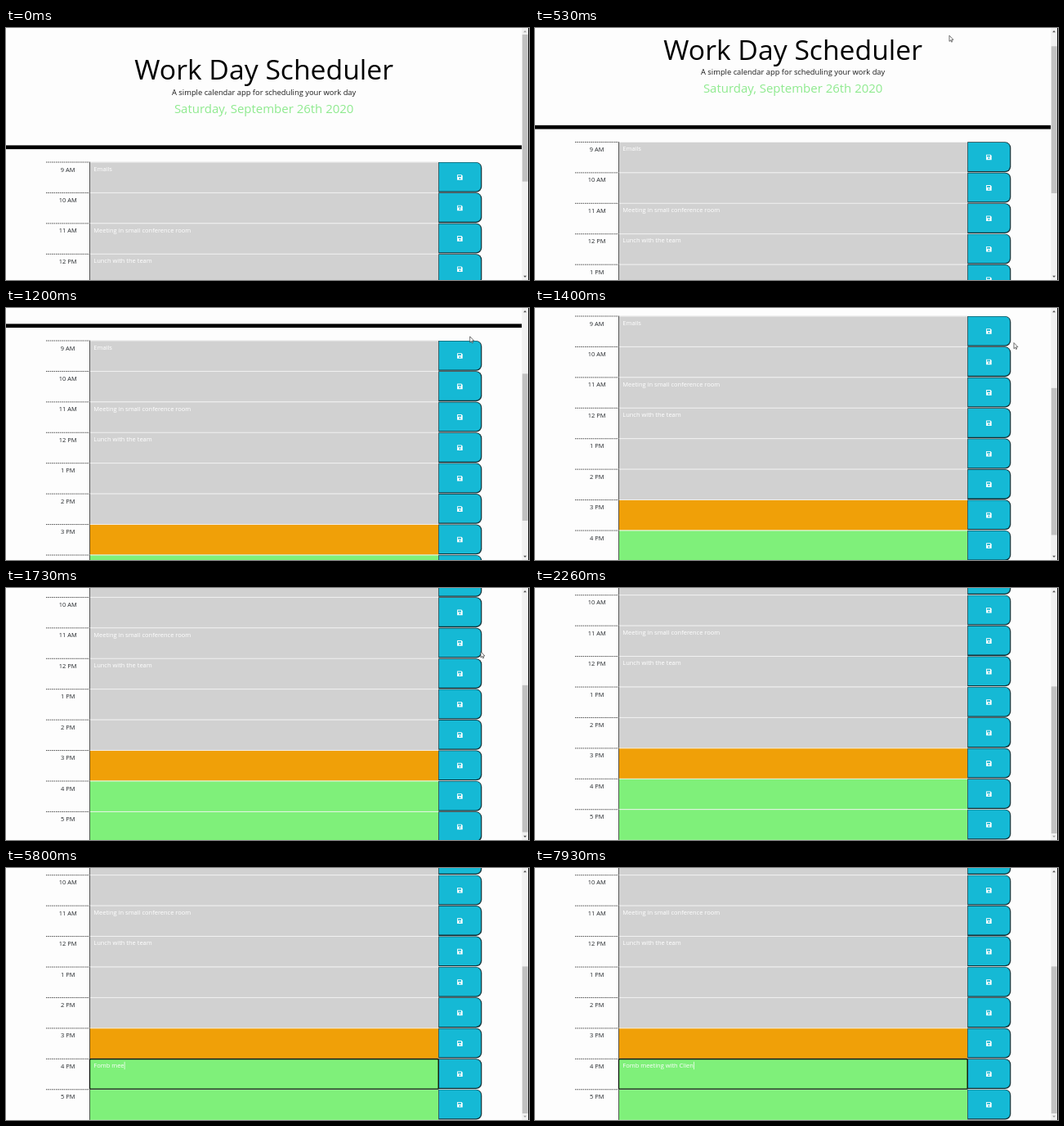
An HTML page with a canvas for the animation above (8000 ms loop, 640 by 308 pixels).

```html
<!DOCTYPE html>
<html lang="en">
<head>
<meta charset="utf-8">
<title>Work Day Scheduler</title>
<style>
html, body { margin: 0; width: 100%; height: 100%; overflow: hidden; background: #fdfdfd; }
canvas { display: block; width: 640px; height: 308px; }
</style>
</head>
<body>
<canvas id="stage"></canvas>
<script>
const W = 640, H = 308, LOOP = 8000, TICK = 1000 / 15;
const PAGE_W = 631.3, MAX_SCROLL = 192.7;
const ROW_TOP = 163.7, ROW_H = 37.43;
const AREA_X = 102.5, AREA_R = 529.2, BTN_R = 582;
const PAST = '#d1d1d1', PRESENT = '#f0a008', FUTURE = '#7ff07a', CYAN = '#15b9d5';

const rows = [
  ['9 AM', PAST, 'Emails'],
  ['10 AM', PAST, ''],
  ['11 AM', PAST, 'Meeting in small conference room'],
  ['12 PM', PAST, 'Lunch with the team'],
  ['1 PM', PAST, ''],
  ['2 PM', PAST, ''],
  ['3 PM', PRESENT, ''],
  ['4 PM', FUTURE, ''],
  ['5 PM', FUTURE, '']
];
const EDIT_ROW = 7, FOCUS_AT = 3000;
const typed = 'Fomb meeting with Clien';
const keyTimes = [3930, 4330, 4530, 4730, 5060, 5530, 5600, 5800, 5930, 6000, 6060, 6130,
  6200, 6460, 6600, 6660, 6800, 6930, 7200, 7460, 7660, 7730, 7930];

const scrollKeys = [[367, 0], [733, 54], [1400, 154], [1600, 181], [1733, 190], [1867, MAX_SCROLL]];
const pointerX = [[400, 495], [733, 525], [1400, 586], [1800, 580], [2130, 530]];
const pointerY = [[400, 4], [733, 17], [1400, 42.5], [1800, 85], [2130, 220]];

const canvas = document.getElementById('stage');
const dpr = window.devicePixelRatio || 1;
canvas.width = W * dpr;
canvas.height = H * dpr;
const c = canvas.getContext('2d');

function lerpKeys(keys, t) {
  if (t <= keys[0][0]) return keys[0][1];
  for (let i = 1; i < keys.length; i++) {
    const [t0, v0] = keys[i - 1], [t1, v1] = keys[i];
    if (t < t1) return v0 + (v1 - v0) * (t - t0) / (t1 - t0);
  }
  return keys[keys.length - 1][1];
}

function rect(x, y, w, h, fill) {
  c.fillStyle = fill;
  c.fillRect(x, y, w, h);
}

function text(str, x, y, size, fill, align = 'left') {
  c.font = `${size}px "Open Sans", sans-serif`;
  c.textAlign = align;
  c.fillStyle = fill;
  c.fillText(str, x, y);
}

function poly(points, fill, stroke) {
  c.beginPath();
  points.forEach(([x, y]) => c.lineTo(x, y));
  c.closePath();
  c.fillStyle = fill;
  c.fill();
  if (stroke) {
    c.strokeStyle = stroke;
    c.lineWidth = 0.7;
    c.stroke();
  }
}

function rightRounded(x, y, w, h, r, fill) {
  c.beginPath();
  c.roundRect(x, y, w, h, [0, r, r, 0]);
  c.fillStyle = fill;
  c.fill();
}

function drawHeader() {
  const mid = PAGE_W / 2;
  text('Work Day Scheduler', mid, 63.2, 33.7, '#000', 'center');
  text('A simple calendar app for scheduling your work day', mid, 81.6, 9.36, '#1c1c1c', 'center');
  text('Saturday, September 26th 2020', mid, 104, 14.97, '#8fea8f', 'center');
  rect(0, 143.4, PAGE_W, 4.7, '#000');
}

function drawSaveIcon(x, y) {
  poly([[x - 3.3, y - 3.3], [x + 2, y - 3.3], [x + 3.3, y - 2], [x + 3.3, y + 3.3], [x - 3.3, y + 3.3]], '#fff');
  rect(x - 2.3, y - 2.4, 3.9, 1.9, CYAN);
  c.beginPath();
  c.arc(x, y + 1.4, 1, 0, Math.PI * 2);
  c.fillStyle = CYAN;
  c.fill();
}

function drawRow([label, color, note], y) {
  c.setLineDash([1.5, 0.9]);
  c.strokeStyle = '#222';
  c.lineWidth = 0.8;
  c.beginPath();
  c.moveTo(49, y + 0.3);
  c.lineTo(AREA_X, y + 0.3);
  c.stroke();
  c.setLineDash([]);
  text(label, 75.7, y + 11.9, 7.49, '#24282c', 'center');

  rect(AREA_X, y, AREA_R - AREA_X, ROW_H, color);
  rect(AREA_X, y - 0.2, AREA_R - AREA_X, 0.9, '#f4f4f4');
  rect(AREA_X - 0.3, y, 0.8, ROW_H, '#333');
  text(note, 107.3, y + 11, 7.49, '#fff');

  const w = BTN_R - AREA_R + 0.3;
  rightRounded(AREA_R, y + 0.2, w, ROW_H - 0.6, 7, '#123036');
  rightRounded(AREA_R + 0.7, y + 0.9, w - 1.9, ROW_H - 2.6, 6, CYAN);
  drawSaveIcon(555.4, y + 18.8);
}

function drawEditor(t, y) {
  if (t < FOCUS_AT) return;
  const count = keyTimes.filter(k => k <= t).length;
  const str = typed.slice(0, count);
  text(str, 107.3, y + 11, 7.49, '#fff');
  c.strokeStyle = '#0c140c';
  c.lineWidth = 1.3;
  c.beginPath();
  c.roundRect(AREA_X, y + 0.5, AREA_R - AREA_X, ROW_H - 0.8, 1);
  c.stroke();
  const last = count ? keyTimes[count - 1] : FOCUS_AT;
  if ((t - last) % 930 < 460) {
    rect(107.5 + c.measureText(str).width, y + 3.8, 0.7, 9.4, '#fff');
  }
}

function drawScrollbar(scroll) {
  rect(PAGE_W, 0, W - PAGE_W, H, '#f1f1f1');
  const x = 635.1;
  const thumb = 292 * H / (H + MAX_SCROLL);
  rect(PAGE_W + 0.5, 8 + scroll / MAX_SCROLL * (292 - thumb), 6.8, thumb, '#c1c1c1');
  poly([[x - 1.9, 5.2], [x, 3.1], [x + 1.9, 5.2]], scroll > 0 ? '#505050' : '#a3a3a3');
  poly([[x - 1.9, 302.8], [x, 304.9], [x + 1.9, 302.8]], scroll < MAX_SCROLL ? '#505050' : '#a3a3a3');
  rect(639, 0, 1, H, '#111');
}

function drawPointer(t) {
  if (t < 400 || t >= 2130) return;
  const x = lerpKeys(pointerX, t), y = lerpKeys(pointerY, t);
  const shape = [[0, 0], [0, 7.2], [1.6, 5.7], [2.7, 8], [3.7, 7.5], [2.7, 5.3], [4.9, 5.1]];
  poly(shape.map(([dx, dy]) => [x + dx, y + dy]), '#fff', '#333');
}

function draw(t) {
  const step = Math.floor((t + 4) / TICK) * TICK;
  const scroll = lerpKeys(scrollKeys, step);
  c.setTransform(dpr, 0, 0, dpr, 0, 0);
  rect(0, 0, W, H, '#fdfdfd');
  c.save();
  c.translate(0, -scroll);
  drawHeader();
  rows.forEach((row, i) => drawRow(row, ROW_TOP + i * ROW_H));
  drawEditor(t, ROW_TOP + EDIT_ROW * ROW_H);
  c.restore();
  drawScrollbar(scroll);
  drawPointer(step);
}

const start = performance.now();
function frame() {
  draw((performance.now() - start) % LOOP);
  requestAnimationFrame(frame);
}
frame();
</script>
</body>
</html>
```
